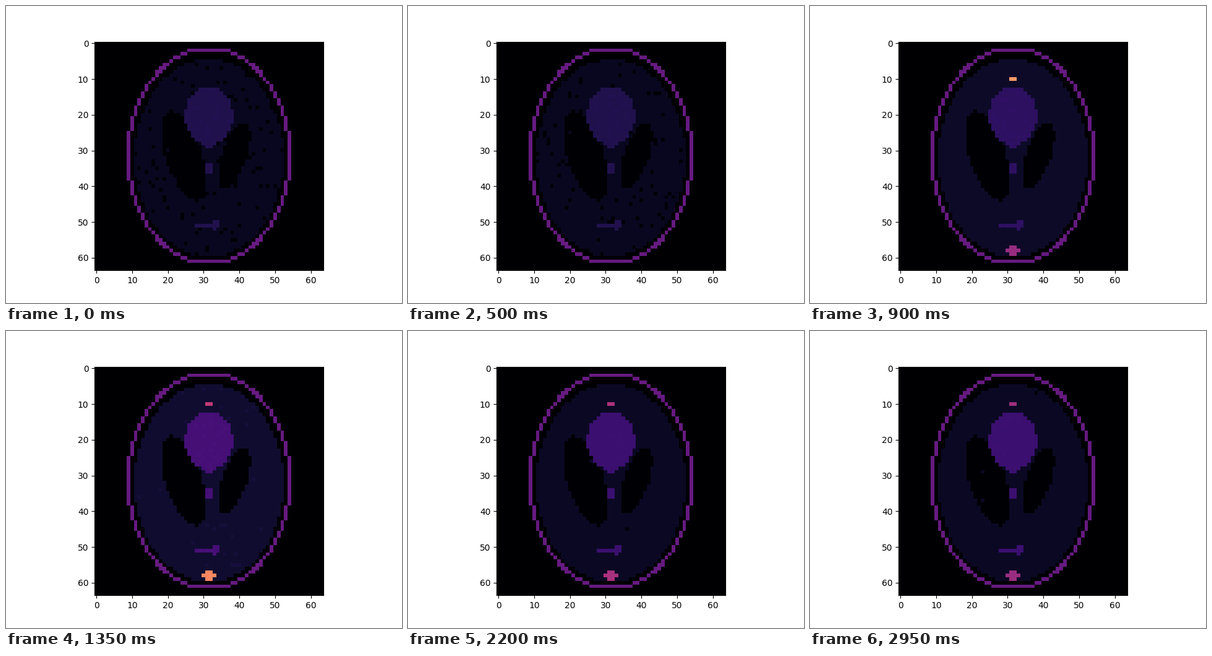
Animation of 640 by 480 pixels, one loop 3 s. Source, as a matplotlib script:

```python
import numpy as np
import matplotlib.pyplot as plt
from matplotlib.animation import FuncAnimation

N = 64
FRAMES, STEP = 60, 50
SIGMA = 0.0067          # noise level
DARK, LIGHT = 0.049, 0.1035
FLUID = 0.012

axis = (np.arange(N) - (N - 1) / 2) / (N / 2)
X, Y = np.meshgrid(axis, -axis)


def ellipse(x, y, a, b, tilt=0):
    t = np.deg2rad(tilt)
    u = (X - x) * np.cos(t) + (Y - y) * np.sin(t)
    v = (Y - y) * np.cos(t) - (X - x) * np.sin(t)
    return (u / a) ** 2 + (v / b) ** 2 <= 1


scalp = ellipse(0, 0, 0.72, 0.95) & ~ellipse(0, 0, 0.69, 0.92)
brain = ellipse(0, -0.0184, 0.6524, 0.864)
ventricles = ellipse(-0.22, 0, 0.16, 0.41, 18) | ellipse(0.22, 0, 0.11, 0.31, -18)
lesion = (ellipse(0, 0.35, 0.21, 0.25)
          | ellipse(0, 0.1, 0.046, 0.046)
          | ellipse(0, -0.1, 0.046, 0.046)
          | ellipse(-0.08, -0.605, 0.046, 0.023)
          | ellipse(0, -0.605, 0.023, 0.023)
          | ellipse(0.06, -0.605, 0.023, 0.046))
artery = ellipse(0, 0.672, 0.025, 0.02)
vein = ellipse(0, -0.828, 0.056, 0.04)


def rise(t, mid, width):
    return 1 / (1 + np.exp(-(t - mid) / width))


def bump(t, mid, width):
    return np.exp(-0.5 * ((t - mid) / width) ** 2)


def tissue_level(t):
    return 0.06 + 0.010 * rise(t, 780, 50) + 0.021 * bump(t, 1260, 240)


def lesion_level(t):
    return 0.138 + 0.062 * rise(t, 920, 60) + 0.026 * bump(t, 1300, 250)


def artery_level(t):
    return 0.55 * np.exp(-(t - 900) / 9500) * rise(t, 800, 40) + 0.6 * bump(t, 800, 81)


def vein_level(t):
    return 0.53 * np.exp(-(t - 900) / 10000) * rise(t, 850, 60) + 0.4 * bump(t, 1200, 150)


def slice_at(i):
    t = i * STEP
    noise = np.random.default_rng(100 + i).normal(0, SIGMA, (N, N))
    base = tissue_level(t)

    img = np.zeros((N, N))
    img[scalp] = 0.305

    noisy = base + noise
    tissue = np.where(noisy < DARK, FLUID, np.where(noisy > LIGHT, base + 0.018, base))
    img[brain] = tissue[brain]

    fluid = np.where(0.03 + noise > DARK, base, 0.004)
    img[ventricles] = fluid[ventricles]

    # slight two-tone mottling inside the lesions
    img[lesion] = (lesion_level(t) + 0.006 * (noise < -SIGMA))[lesion]

    img[artery] = max(base, artery_level(t))
    img[vein] = max(base, vein_level(t)) if t > 600 else tissue[vein]
    return img


fig, ax = plt.subplots(figsize=(6.4, 4.8), dpi=100)
im = ax.imshow(slice_at(0), cmap="magma", vmin=0, vmax=1, interpolation="nearest")


def update(i):
    im.set_data(slice_at(i))
    return (im,)


anim = FuncAnimation(fig, update, frames=FRAMES, interval=STEP, repeat=True, repeat_delay=0)
plt.show()
```
